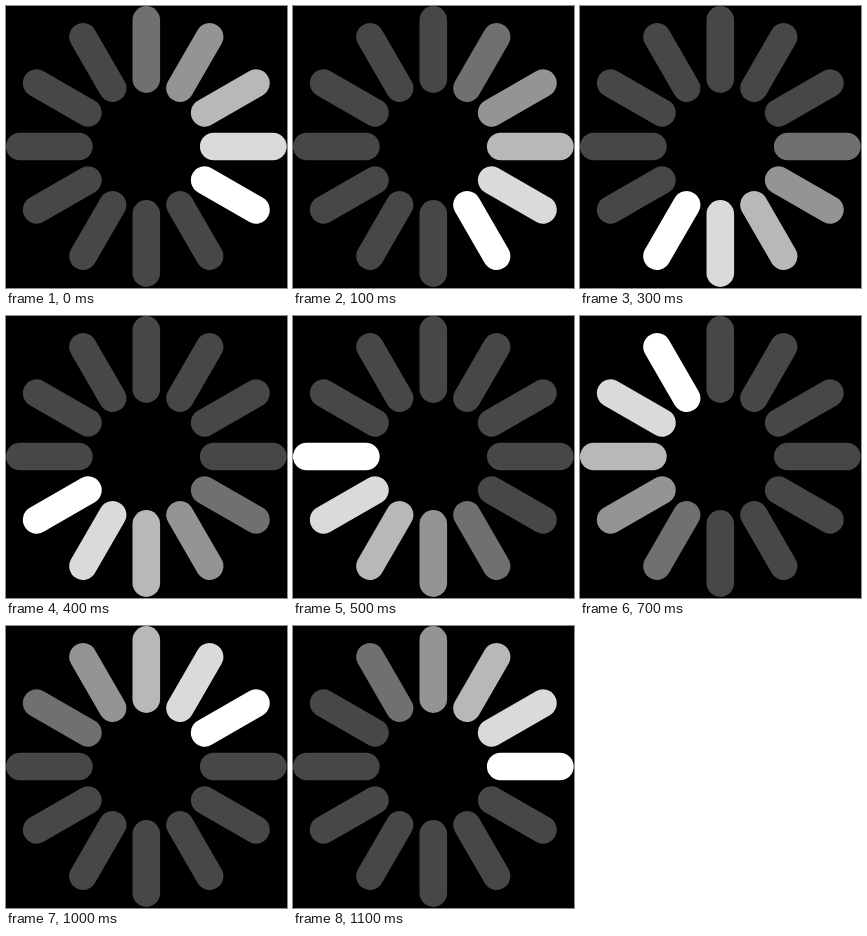
Write an HTML page that moves like this. It is 281 by 282 pixels and loops after 1.2 s.

```html
<!DOCTYPE html>
<html lang="en">
<head>
<meta charset="utf-8">
<title>Spinner</title>
<style>
  html, body { margin: 0; width: 100%; height: 100%; overflow: hidden; background: #000; }
  svg { display: block; width: 100%; height: 100%; }
</style>
</head>
<body>
<svg viewBox="0 0 281 282" fill="none" stroke-width="27.6" stroke-linecap="round">
  <g id="spokes" transform="translate(140.3 140.5)"></g>
</svg>
<script>
  const COUNT = 12;
  const STEP = 100;
  const FIRST = 4; // spoke that is lit when the loop starts, clockwise from the top
  const TAIL = ['#fff', '#dadada', '#b8b8b8', '#949494', '#707070'];
  const REST = '#474747';

  const group = document.getElementById('spokes');
  const spokes = Array.from({ length: COUNT }, (_, i) => {
    const line = document.createElementNS('http://www.w3.org/2000/svg', 'line');
    line.setAttribute('y1', -67.4);
    line.setAttribute('y2', -126.6);
    line.setAttribute('transform', `rotate(${i * 360 / COUNT})`);
    return group.appendChild(line);
  });

  function draw(time) {
    const head = (FIRST + Math.floor(time / STEP)) % COUNT;
    spokes.forEach((spoke, i) => {
      const age = (head - i + COUNT) % COUNT;
      spoke.setAttribute('stroke', TAIL[age] || REST);
    });
  }

  const start = performance.now();
  function tick() {
    draw(performance.now() - start);
    requestAnimationFrame(tick);
  }
  tick();
</script>
</body>
</html>
```
